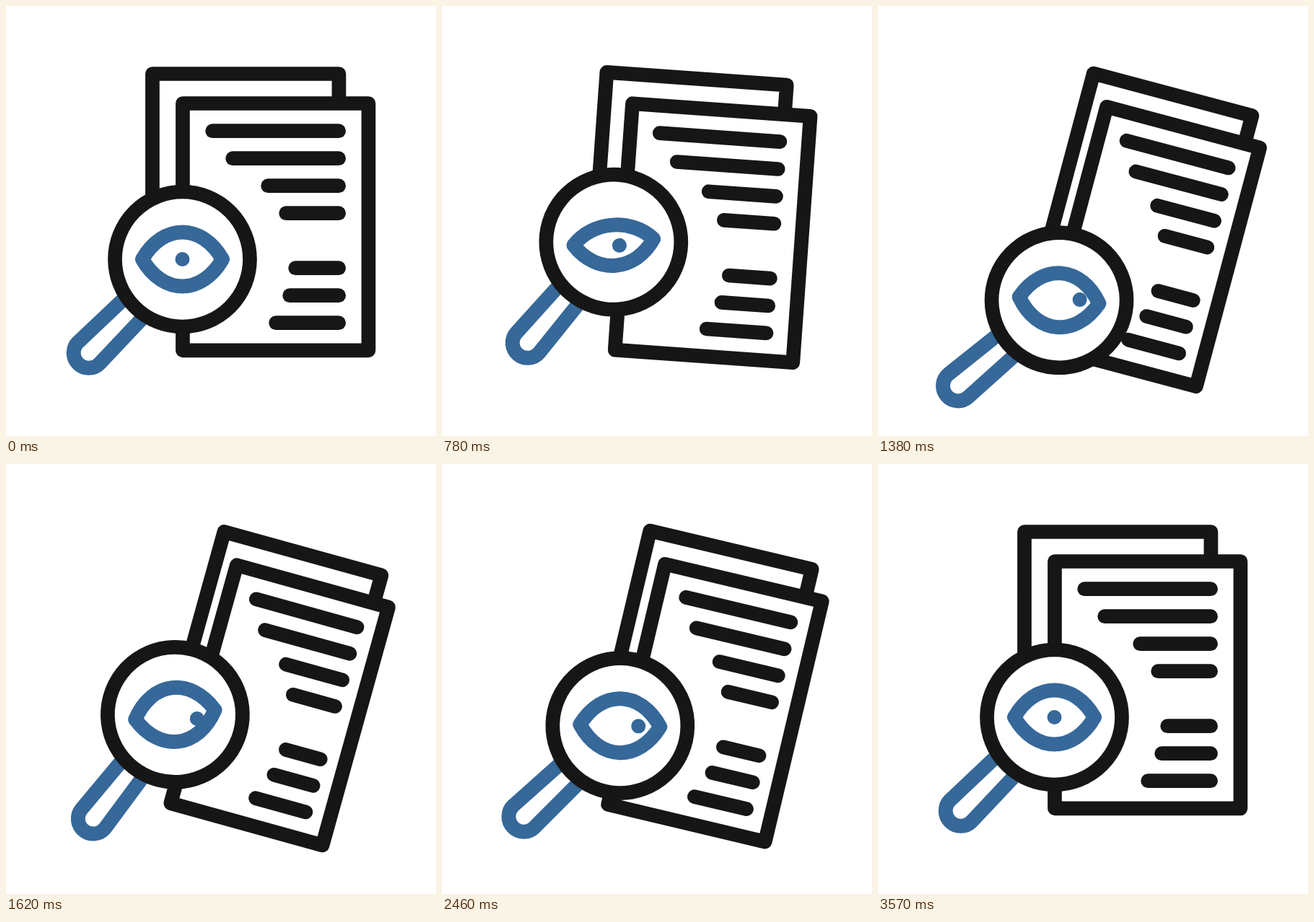
Write an HTML page with a canvas that moves like this. It is 596 by 596 pixels and loops after 3600 ms.

```html
<!DOCTYPE html>
<html lang="en">
<head>
<meta charset="utf-8">
<title>Document review</title>
<style>
html, body { margin: 0; width: 100%; height: 100%; overflow: hidden; background: #fff; }
canvas { display: block; }
</style>
</head>
<body>
<canvas id="stage" width="596" height="596"></canvas>
<script>
const ctx = document.getElementById('stage').getContext('2d');
const LOOP = 3600, STEP = 30, RAD = Math.PI / 180;
const INK = '#161616', BLUE = '#366899', PAPER = '#fff';

// Text rows: [row index, length]
const ROWS = [[0, 175], [1, 147], [2, 98], [3, 73], [5, 60], [6, 68], [7, 87]];

// Keys: [time, value]
const LENS_DROP = [[0, 0], [450, 45], [900, -33], [1350, 52.5], [1800, -24], [2250, 18], [2700, 0]];
const LENS_TILT = [[0, 0], [500, -17.8], [1130, 14], [1680, -7.5], [2170, 4.5], [2660, 0]];
const BLINK = [[0, 0], [500, 1], [930, 0]];

const mix = (a, b, k) => a + (b - a) * k;
const smooth = k => k * k * (3 - 2 * k);

function keyed(keys, t) {
  for (let i = 1; i < keys.length; i++) {
    const [t0, v0] = keys[i - 1], [t1, v1] = keys[i];
    if (t < t1) return mix(v0, v1, smooth((t - t0) / (t1 - t0)));
  }
  return keys[keys.length - 1][1];
}

// Strong ease in and out, cubic-bezier(.78, 0, .22, 1)
function ease(x) {
  let lo = 0, hi = 1;
  for (let i = 0; i < 24; i++) {
    const u = (lo + hi) / 2, v = 1 - u;
    if (2.34 * u * v * v + 0.66 * u * u * v + u * u * u < x) lo = u; else hi = u;
  }
  return smooth(lo);
}

function stroke(color, width, fill) {
  if (fill) { ctx.fillStyle = fill; ctx.fill(); }
  ctx.strokeStyle = color;
  ctx.lineWidth = width;
  ctx.stroke();
}

function polyline(points, closed, fill) {
  ctx.beginPath();
  points.forEach(([x, y]) => ctx.lineTo(x, y));
  if (closed) ctx.closePath();
  stroke(INK, 19.7, fill);
}

function drawPages(turn) {
  const w = mix(257.5, 218, turn) / 2, h = 171.2;
  const left = -w - 42 + 13 * turn, right = w - 41 + 20 * turn, top = -h - 41 + turn;
  ctx.save();
  ctx.translate(373.7 + 5.5 * turn, 306.2 + 28.3 * turn + 6 * turn * (1 - turn));
  ctx.rotate(15.6 * turn * RAD);
  polyline([[left, top + 300], [left, top], [right, top], [right, -h]]);
  polyline([[-w, -h], [w, -h], [w, h], [-w, h]], true, PAPER);
  const end = w - 41.3 + 6.8 * turn;
  for (const [row, length] of ROWS) {
    const y = -h + 38.2 + 38 * row;
    polyline([[end - length * (1 - 0.172 * turn), y], [end, y]]);
  }
  ctx.restore();
}

function drawHandle() {
  ctx.save();
  ctx.rotate(135 * RAD);
  ctx.beginPath();
  ctx.moveTo(80, -18);
  ctx.lineTo(183.5, -21);
  ctx.arc(183.5, 0, 21, -Math.PI / 2, Math.PI / 2);
  ctx.lineTo(80, 18);
  stroke(BLUE, 20, PAPER);
  ctx.restore();
}

function drawEye(blink, x, y) {
  const upper = mix(-37.5, 12, blink) / 0.75, lower = mix(37.5, 20, blink) / 0.75;
  ctx.beginPath();
  ctx.moveTo(-55.5, 0);
  ctx.bezierCurveTo(-27, upper, 27, upper, 55.5, 0);
  ctx.bezierCurveTo(27, lower, -27, lower, -55.5, 0);
  ctx.closePath();
  stroke(BLUE, 20);
  ctx.beginPath();
  ctx.arc(x, y, 10, 0, 2 * Math.PI);
  ctx.fillStyle = BLUE;
  ctx.fill();
}

function drawMagnifier(t, turn) {
  const tilt = keyed(LENS_TILT, t);
  ctx.save();
  ctx.translate(184.5, 433 + keyed(LENS_DROP, t));
  ctx.rotate(tilt * RAD);
  ctx.translate(60, -82);
  drawHandle();
  ctx.beginPath();
  ctx.arc(0, 0, 93.5, 0, 2 * Math.PI);
  stroke(INK, 19.7, PAPER);
  drawEye(keyed(BLINK, t), 29.7 * turn, 2 * turn - 1.05 * tilt);
  ctx.restore();
}

function draw(now) {
  const t = Math.floor(now % LOOP / STEP) * STEP;
  const turn = ease(1 - Math.abs(t / (LOOP / 2) - 1));
  ctx.fillStyle = PAPER;
  ctx.fillRect(0, 0, 596, 596);
  ctx.lineCap = ctx.lineJoin = 'round';
  drawPages(turn);
  drawMagnifier(t, turn);
}

const start = performance.now();
function tick() {
  draw(performance.now() - start);
  requestAnimationFrame(tick);
}
tick();
</script>
</body>
</html>
```
